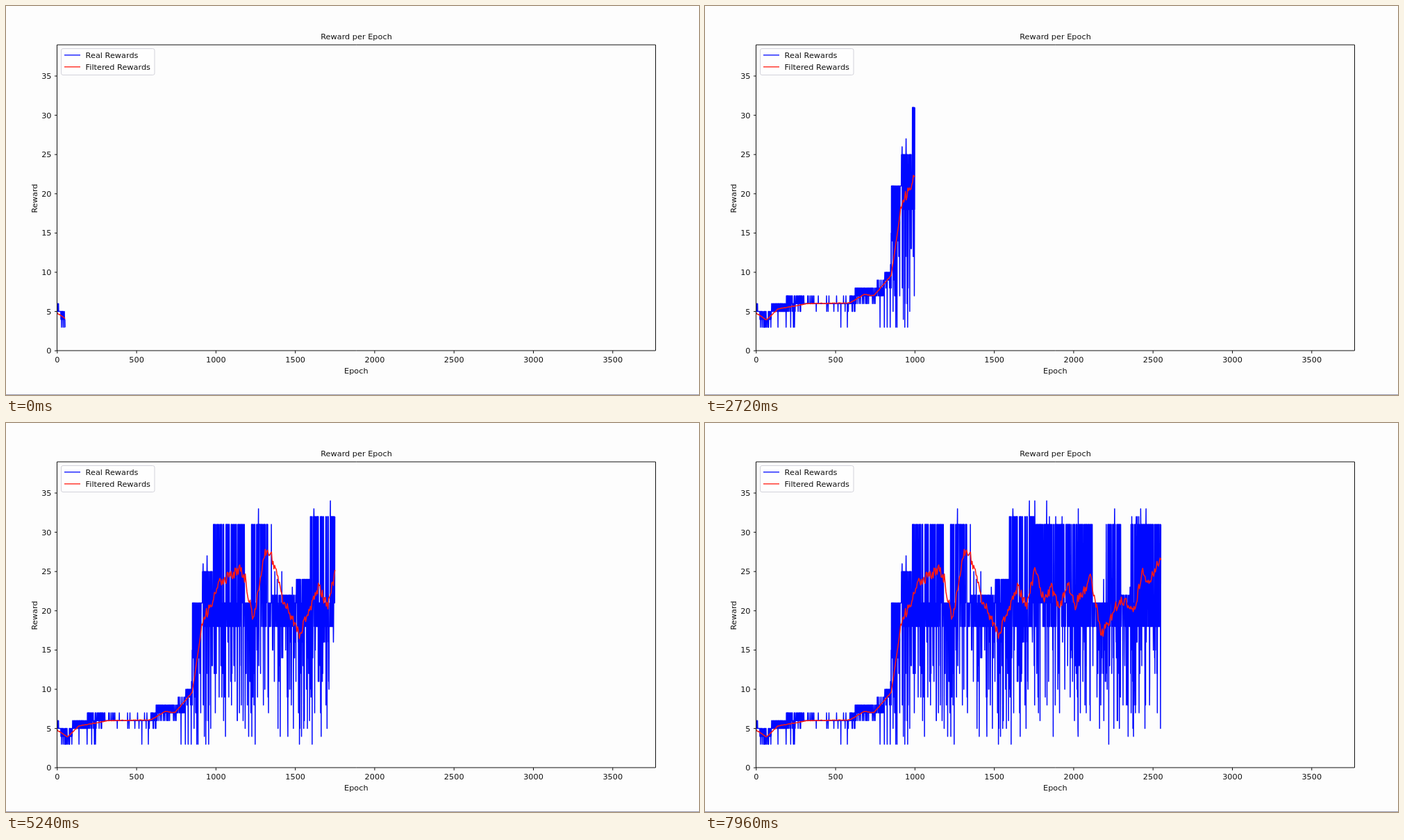
Recreate the animation shown at these times as an HTML page with a canvas. Size 998 px wide and 561 px high, loop 8000 ms.

```html
<!DOCTYPE html>
<html lang="en">
<head>
<meta charset="utf-8">
<title>Reward per Epoch</title>
<style>
html, body { margin: 0; width: 100%; height: 100%; overflow: hidden; background: #fdfdfd; }
canvas { display: block; }
</style>
</head>
<body>
<canvas id="chart" width="998" height="561"></canvas>
<script>
const ctx = document.getElementById('chart').getContext('2d');
const LOOP = 8000, BATCH = 50, LAST = 2550;
const BLUE = '#0008ff', RED = '#ff1a10', INK = '#111';

const px = epoch => 73.8 + epoch * 0.22857;
const py = reward => 497.2 - reward * 11.32;

// Finished batches over time: [ms, batches]
const progress = [[0, 1.5], [3400, 24.8], [LOOP, 51.6]];

// Key points of the filtered reward: [epoch, reward]
const trend = [
  [0, 4.8], [65, 3.9], [135, 5.3], [320, 6], [590, 6.1], [680, 7.2], [740, 7], [850, 9.6],
  [915, 18.5], [1030, 23.7], [1150, 25.2], [1185, 24], [1235, 18.5], [1305, 27.2], [1350, 27],
  [1420, 21.5], [1525, 17], [1650, 23.3], [1700, 20.4], [1755, 25], [1815, 21.4], [1860, 23],
  [1910, 20.4], [1965, 23.3], [2005, 20.6], [2110, 24.2], [2175, 16.8], [2290, 21.5],
  [2380, 20.2], [2440, 25.2], [2465, 23.5], [2550, 26.5]
];

// Usual best reward once the agent has learned: [from epoch, reward]
const ceilings = [
  [850, 21], [915, 25], [980, 31], [1180, 21], [1220, 31], [1350, 22], [1510, 24],
  [1595, 32], [1755, 31], [2120, 21], [2205, 31], [2300, 22], [2360, 31]
];

function interpolate(points, at) {
  const i = Math.max(1, points.findIndex(p => p[0] >= at));
  const [x0, y0] = points[i - 1], [x1, y1] = points[i];
  return y0 + (y1 - y0) * (at - x0) / (x1 - x0);
}

let seed = 7;
function random() {
  seed = (seed * 1664525 + 1013904223) % 4294967296;
  return seed / 4294967296;
}

// Early on the reward hops around the trend, with a steady stretch in the middle.
function earlyReward(epoch) {
  const swing = epoch > 300 && epoch < 590 ? .05 : .3;
  const r = random();
  if (r < .012) return 3;
  const base = Math.round(interpolate(trend, epoch));
  if (r < swing) return base + 1;
  return r > 1 - swing / 2 && base !== 5 ? base - 1 : base;
}

// Later it jumps between a floor and a ceiling; dips are rarer when the trend is high.
function lateReward(epoch) {
  const ceiling = ceilings.findLast(c => c[0] <= epoch)[1];
  const dip = .6 - .02 * Math.min(25, interpolate(trend, epoch));
  const r = random(), pick = random();
  if (r < dip) return 3 + Math.floor(14 * pick ** .75);
  if (r < dip + .35) return ceiling;
  if (r > .985) return Math.min(34, ceiling + 1 + Math.floor(pick * 3));
  return pick < .5 ? 18 : 21;
}

const real = Array.from({ length: LAST }, (_, epoch) =>
  [epoch, epoch < 850 ? earlyReward(epoch) : lateReward(epoch)]);

const filtered = Array.from({ length: LAST / 5 + 1 }, (_, i) => {
  const epoch = i * 5, noise = epoch > 900 ? 1.4 : .1;
  return [epoch, interpolate(trend, epoch) + (random() - .5) * noise];
});

function line(points, color, width) {
  ctx.beginPath();
  for (const [x, y] of points) ctx.lineTo(x, y);
  ctx.strokeStyle = color;
  ctx.lineWidth = width;
  ctx.stroke();
}

function series(data, end, color) {
  line(data.filter(d => d[0] <= end).map(([e, r]) => [px(e), py(r)]), color, 1.5);
}

function text(label, x, y, align = 'center') {
  ctx.fillStyle = INK;
  ctx.textAlign = align;
  ctx.fillText(label, x, y);
}

function drawAxes() {
  ctx.strokeStyle = INK;
  ctx.lineWidth = 1;
  ctx.strokeRect(73.5, 56, 862, 441);
  for (let e = 0; e <= 3500; e += 500) {
    line([[px(e), 497], [px(e), 501]], INK, 1);
    text(e, px(e), 514);
  }
  for (let r = 0; r <= 35; r += 5) {
    line([[70, py(r)], [74, py(r)]], INK, 1);
    text(r, 65.5, py(r) + 4, 'right');
  }
  text('Reward per Epoch', 504.5, 48);
  text('Epoch', 504.3, 530);
  ctx.save();
  ctx.translate(44.5, 277.5);
  ctx.rotate(-Math.PI / 2);
  text('Reward', 0, 0);
  ctx.restore();
}

function drawLegend() {
  ctx.beginPath();
  ctx.roundRect(79.5, 61.5, 134.5, 38, 2.5);
  ctx.fillStyle = '#fefefe';
  ctx.fill();
  ctx.strokeStyle = '#d2d2da';
  ctx.lineWidth = 1;
  ctx.stroke();
  [['Real Rewards', BLUE], ['Filtered Rewards', RED]].forEach(([label, color], i) => {
    const y = 70.8 + 17 * i;
    line([[84, y], [107, y]], color, 1.3);
    text(label, 114.6, y + 4, 'left');
  });
}

function draw(now) {
  const end = BATCH * Math.floor(interpolate(progress, now % LOOP));
  ctx.fillStyle = '#fdfdfd';
  ctx.fillRect(0, 0, 998, 561);
  line([[0, 560.5], [998, 560.5]], '#9a9aac', 1);
  ctx.font = '11.3px "DejaVu Sans", sans-serif';
  ctx.lineJoin = 'round';
  series(real, end - 1, BLUE);
  series(filtered, end, RED);
  drawAxes();
  drawLegend();
  requestAnimationFrame(draw);
}
requestAnimationFrame(draw);
</script>
</body>
</html>
```
